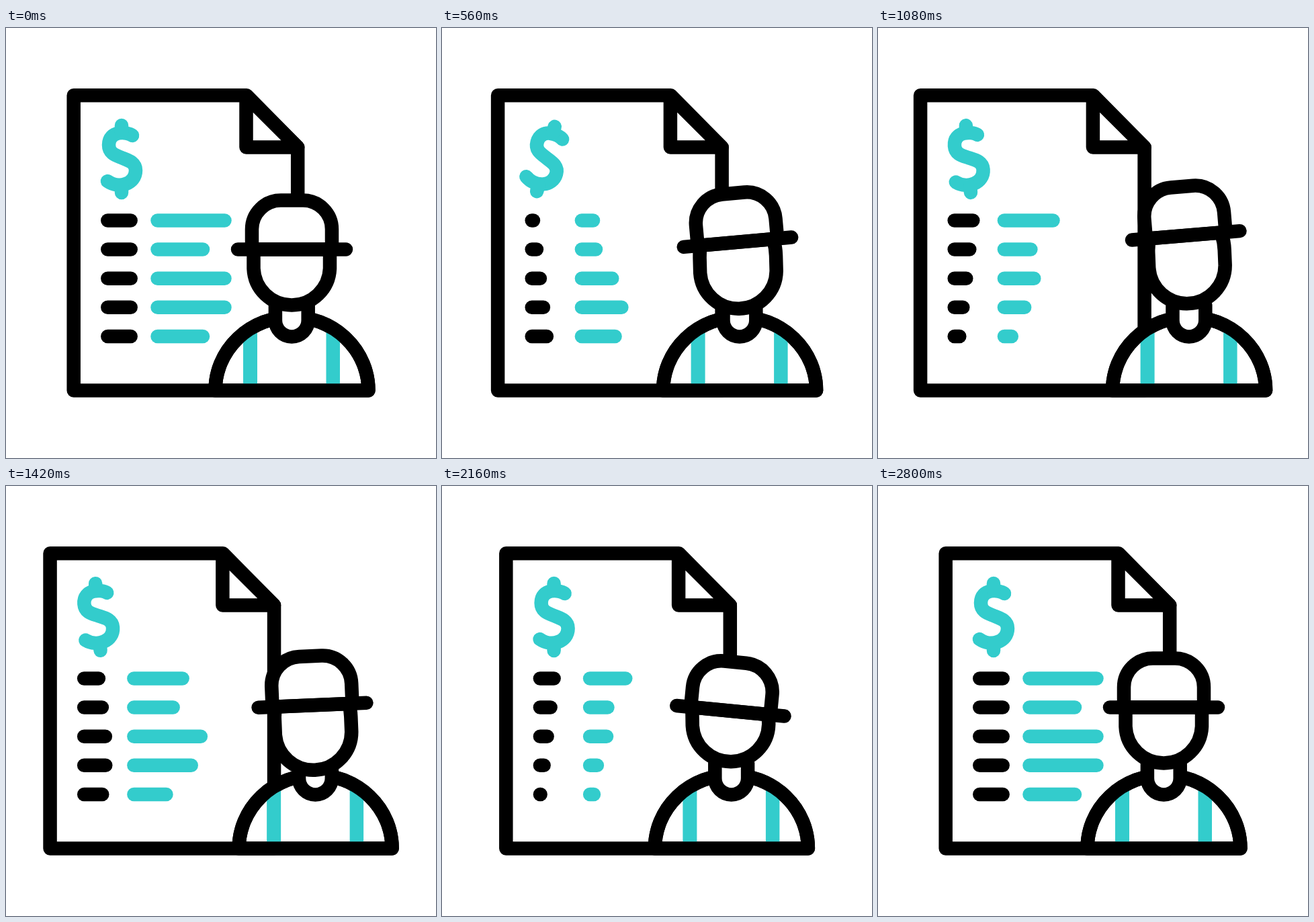
Recreate the animation shown at these times as an HTML page. Size 640 by 640 pixels, loop 3.6 s.

```html
<!DOCTYPE html>
<html lang="en">
<head>
<meta charset="utf-8">
<title>Worker invoice</title>
<style>
  html, body { margin: 0; width: 100%; height: 100%; overflow: hidden; background: #fff; }
  svg { display: block; width: 100vw; height: 100vh; }
  svg * { stroke-linecap: round; stroke-linejoin: round; }
  .ink { fill: #fff; stroke: #000; stroke-width: 20.5; }
  .teal { fill: none; stroke: #33cccc; stroke-width: 20.5; }
  .strap { fill: #33cccc; }
  .line { fill: none; }
</style>
</head>
<body>
<svg viewBox="0 0 640 640">
  <g id="doc">
    <path class="ink" d="M434.2 539.5H100.7V100.3H358L434.2 177.5Z"/>
    <path class="ink" d="M357.5 101V177.5H434.2Z"/>
    <g id="dollar" class="teal">
      <path d="M188 160C180 154 153 152 153 174C153 186 162 189 172 193S193 200 193 212C193 232 168 240 151 228"/>
      <path d="M172 145V155M172 235V245"/>
    </g>
    <g id="rows"></g>
  </g>
  <g id="worker">
    <path class="ink" d="M311.5 539.5A114 109.5 0 0 1 539.5 539.5Z"/>
    <path class="strap" d="M353 456L374 442V530H353ZM476.5 442L497 456V530H476.5Z"/>
    <path class="ink line" d="M311.5 539.5A114 109.5 0 0 1 539.5 539.5Z"/>
    <path class="ink" d="M400.9 412V435A24.4 24.4 0 0 0 449.7 435V412"/>
    <g id="head">
      <path class="ink" d="M380 297Q368.5 310 368.5 335V358A56.8 56.8 0 0 0 482 358V335Q482 310 470 297Z"/>
      <g id="hat" class="ink">
        <path d="M366 329.5V299.5A43 43 0 0 1 409 256.5H442A43 43 0 0 1 485 299.5V329.5Z"/>
        <path d="M345 329.5H506"/>
      </g>
    </g>
  </g>
</svg>
<script>
const LOOP = 3600, SWAY = 2480, HALF = 600, ROW_LAG = 87, BAR_LAG = 50;
const $ = id => document.getElementById(id);
const place = (id, x, y, turn = 0, cx = 0, cy = 0) =>
  $(id).setAttribute('transform', `translate(${x} ${y}) rotate(${turn} ${cx} ${cy})`);

// Turning points as [time, value], eased in and out between them.
const slide = [[0, 0], [1190, 38.5], [2460, 0]];
const spin = [[0, 0], [490, 376], [1250, 353], [1650, 360]];
const tilt = [[0, 0], [780, -4.3], [1420, 0], [1780, -4], [2160, 6.5], [SWAY, 0]];

function ease(keys, t) {
  const i = keys.findIndex(([time]) => time > t);
  if (i < 0) return keys.at(-1)[1];
  const [[t0, a], [t1, b]] = [keys[i - 1], keys[i]];
  const p = (t - t0) / (t1 - t0);
  return a + (b - a) * p * p * (3 - 2 * p);
}

// Length factor of a row: shrinks and grows twice, then rests at full length.
const pulse = t => t < 0 || t > 4 * HALF ? 1 : Math.abs(1 - t % (2 * HALF) / HALF);

function addLine(x, y, cls) {
  const line = document.createElementNS('http://www.w3.org/2000/svg', 'line');
  for (const [k, v] of Object.entries({ x1: x, x2: x, y1: y, y2: y, class: cls }))
    line.setAttribute(k, v);
  return $('rows').appendChild(line);
}

const rows = [...Array(5).keys()].map(i => {
  const y = 286.5 + 43.1 * i;
  return {
    size: i % 3 === 1 ? 67.5 : 100,
    label: addLine(151.3, y, 'ink'),
    bar: addLine(225.5, y, 'teal')
  };
});

function drawHead(t) {
  const p = Math.min(t / SWAY, 1);
  const arc = Math.sin(Math.PI * p);
  const bob = 9 * Math.sin(4 * Math.PI * p) * (1 - p ** 4);
  const angle = ease(tilt, t);
  place('head', 0, 4 * arc + bob, -2.5 * arc, 425.3, 425);
  place('hat', 0, 2 * angle - 14 * arc, angle, 425.5, 329.5);
}

function draw(t) {
  const shift = ease(slide, t);
  place('doc', -shift, 0);
  place('worker', shift, 0);
  place('dollar', 0, 0, ease(spin, t), 172, 195);
  drawHead(t);
  rows.forEach(({ size, label, bar }, i) => {
    const u = t - i * ROW_LAG;
    label.setAttribute('x2', 151.31 + 34.4 * pulse(u));
    bar.setAttribute('x2', 225.5 + size * (.027 + .973 * pulse(u - BAR_LAG)));
  });
}

const start = performance.now();
(function frame() {
  draw((performance.now() - start) % LOOP);
  requestAnimationFrame(frame);
})();
</script>
</body>
</html>
```
